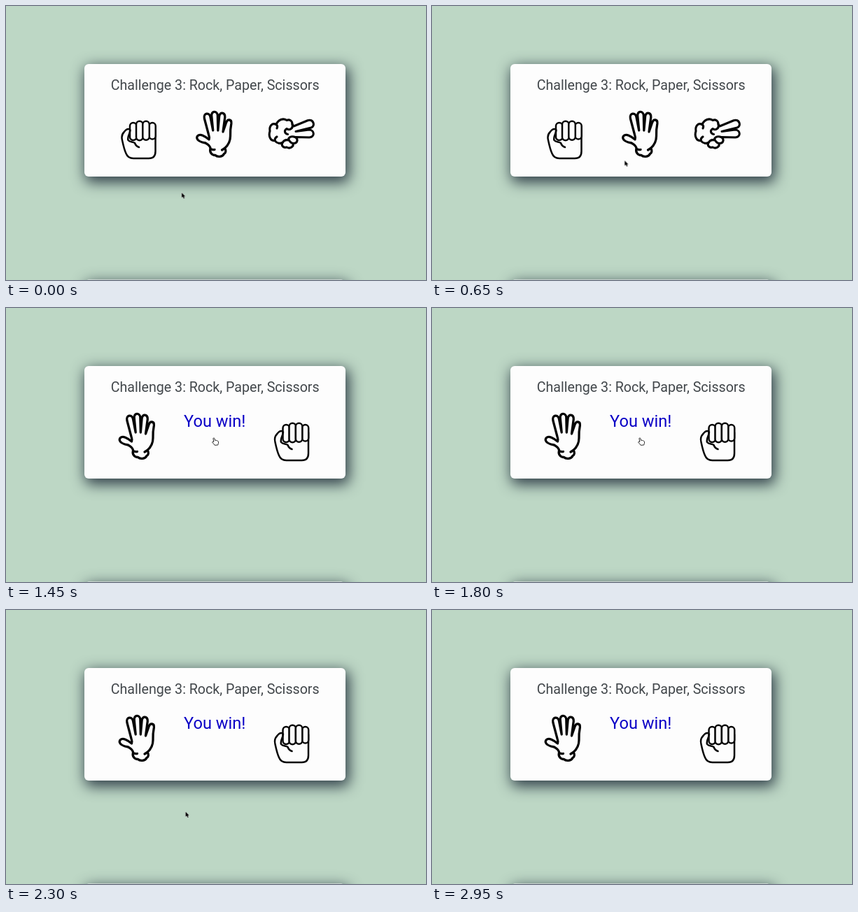
An HTML page for the animation above (3000 ms loop, 600 px wide and 392 px high).

```html
<!DOCTYPE html>
<html lang="en">
<head>
<meta charset="utf-8">
<title>Rock, Paper, Scissors</title>
<style>
  html, body { margin: 0; width: 100%; height: 100%; overflow: hidden; background: #bdd7c5; }
  .stage { position: relative; width: 600px; height: 392px; overflow: hidden; background: #bdd7c5; }
  .card {
    position: absolute; left: 112px; width: 373px; height: 161px;
    border-radius: 6px; background: #fdfdfd;
    box-shadow: 3px 6px 20px 2px #2f3e48;
  }
  .tile {
    position: absolute; left: 263px; top: 148px; width: 70px; height: 71px;
    background: #fff; box-shadow: 4px 4px 15px rgba(0, 0, 0, .58);
  }
  svg { position: absolute; left: 0; top: 0; }
  text { font-family: Roboto, Inter, sans-serif; }
  .title { font-size: 19.65px; fill: #42474b; }
  .result { font-size: 23.6px; fill: #0a00c6; }
  .hand { fill: #fdfdfd; stroke: #050505; stroke-linejoin: round; stroke-linecap: round; }
  .hand .crease { fill: none; }

  .choice, .outcome, .tile, .arrow, .pointer { animation: 3s step-end infinite; }
  .choice { animation-name: choice; }
  .outcome { animation-name: outcome; }
  .tile { animation-name: hover; }
  .arrow { animation-name: arrow; }
  .pointer { animation-name: pointer; }
  .cursor { animation: move 3s linear infinite; }

  @keyframes choice  { 0% { opacity: 1; } 48.3%, 100% { opacity: 0; } }
  @keyframes outcome { 0% { opacity: 0; } 48.3%, 100% { opacity: 1; } }
  @keyframes hover   { 0% { opacity: 0; } 23.3% { opacity: 1; } 48.3%, 100% { opacity: 0; } }
  @keyframes arrow   { 0% { opacity: 1; } 23.3% { opacity: 0; } 66.6% { opacity: 1; } 90%, 100% { opacity: 0; } }
  @keyframes pointer { 0% { opacity: 0; } 23.3% { opacity: 1; } 66.6%, 100% { opacity: 0; } }
  @keyframes move {
    0%, 8.33% { transform: translate(251px, 267px); animation-timing-function: ease-in; }
    21.66% { transform: translate(275px, 221.5px); animation-timing-function: ease-out; }
    28.3%, 65% { transform: translate(297px, 186px); animation-timing-function: ease-in-out; }
    76.6%, 100% { transform: translate(256.5px, 288.5px); }
  }
</style>
</head>
<body>
<div class="stage">
  <div class="card" style="top:83px"></div>
  <div class="card" style="top:391px;transform:translateY(.6px)"></div>
  <div class="tile"></div>

  <svg width="600" height="392" viewBox="0 0 600 392">
    <defs>
      <g id="rock" class="hand" stroke-width="2.5">
        <path d="M178 177C174 174.500 170.500 177.500 168.500 180.500C165 184 165 188 166 192C167.500 199 169 206 171.500 211C173.500 216 177 218 182 218H204C210.500 218 213.500 214 213.500 208V178Z"/>
        <rect x="177" y="167" width="9.500" height="25" rx="4.700"/>
        <rect x="204.500" y="167" width="9.200" height="23.500" rx="4.600"/>
        <rect x="186" y="164.800" width="9.500" height="27.500" rx="4.700"/>
        <rect x="195.300" y="164.800" width="9.500" height="27" rx="4.700"/>
        <path class="crease" d="M177.500 177.500C177 183 173 187 174.500 192C177 195 181 194 184 196C185 199 187 201 190 202"/>
      </g>
      <g id="paper" class="hand" stroke-width="3.300">
        <path d="M289.500 184L283.400 161C281.700 153 290.300 151.800 291.900 158.500L295.700 178L293.700 157C293.200 149.800 301.800 149.500 302.300 156.500L302.800 178L304.600 158C305.300 151 313 152 312.800 159L310 180L314.500 167C316.500 161 322.500 162 321.900 168C320.500 175 320.300 180 320.500 186C320.500 194 317.500 199 312.500 203.500C314.500 206 314.500 210 311.500 211.500C309.500 216 302 216.500 299 213.500C294 213.500 290.500 209 292 204.500C292.500 201 288.500 198 285 196C279 195 273.500 193 272.700 189C272.600 184.500 277 183.500 281 185.300C285 187 287 188.500 290 191C291 188 290.200 186 289.500 184Z"/>
        <path class="crease" d="M292 204.500C294 205.300 296 206 298 205.500M312.500 203.500L308.500 206"/>
      </g>
      <g id="scissors" class="hand" stroke-width="3.100">
        <path d="M386 169.500C380 166.500 375.800 172 377 179C374.500 186 378 194 384 192.500C387 197 392 197 395 195.500C392.500 199.500 396.500 203.500 401 202C406 205 411.500 201 410 196.500C416.500 197 418 190.500 413 187.500L433 188C441.200 188.300 441.500 177.500 433 177L414 179.500L436 174C442.500 171.500 439 160.800 431 163.800L411 172L409 169C409 164 405 161.800 401 163.500C396 160 389 162.500 386 169.500Z"/>
        <path class="crease" d="M409 169C410.500 175.500 405 178.500 401 175.500C396.500 178.500 398.500 183 402.500 183.500M386 169.500C388 171 388 173 387 175M384 192.500C384 190 385 188 387 187M395 195.500C397 192 400 191 403.500 192M413 187.500C409 186 405 187 403.500 190C405 194 407 196 410 196.500"/>
      </g>
    </defs>

    <text class="title" x="149.700" y="119.700">Challenge 3: Rock, Paper, Scissors</text>

    <g class="choice">
      <use href="#rock"/>
      <use href="#paper"/>
      <use href="#scissors"/>
    </g>
    <g class="outcome">
      <use href="#paper" x="-110.500"/>
      <use href="#rock" x="218.500"/>
      <text class="result" x="254" y="169.500">You win!</text>
    </g>

    <g class="cursor">
      <path class="arrow" transform="scale(.85)" d="M0 0V8.600L2 6.900L3.400 10L4.900 9.400L3.600 6.400H6.200Z" fill="#000" stroke="#fff" stroke-width=".9" paint-order="stroke"/>
      <path class="pointer" d="M-1 1C-1.200-.4 .6-.5 .9 .8L1.700 3.600C2.700 2.900 3.500 3.100 3.800 3.800C4.700 3.400 5.300 3.800 5.500 4.500C6.300 4.400 6.500 5 6.500 6C6.500 8 6 8.600 5.700 10L1.200 10.300C.3 8.600-1.200 7.500-2.200 6.300C-2.500 5.200-1.300 4.700-.2 5.500Z" fill="#fff" stroke="#111" stroke-width=".9"/>
    </g>
  </svg>
</div>
</body>
</html>
```
